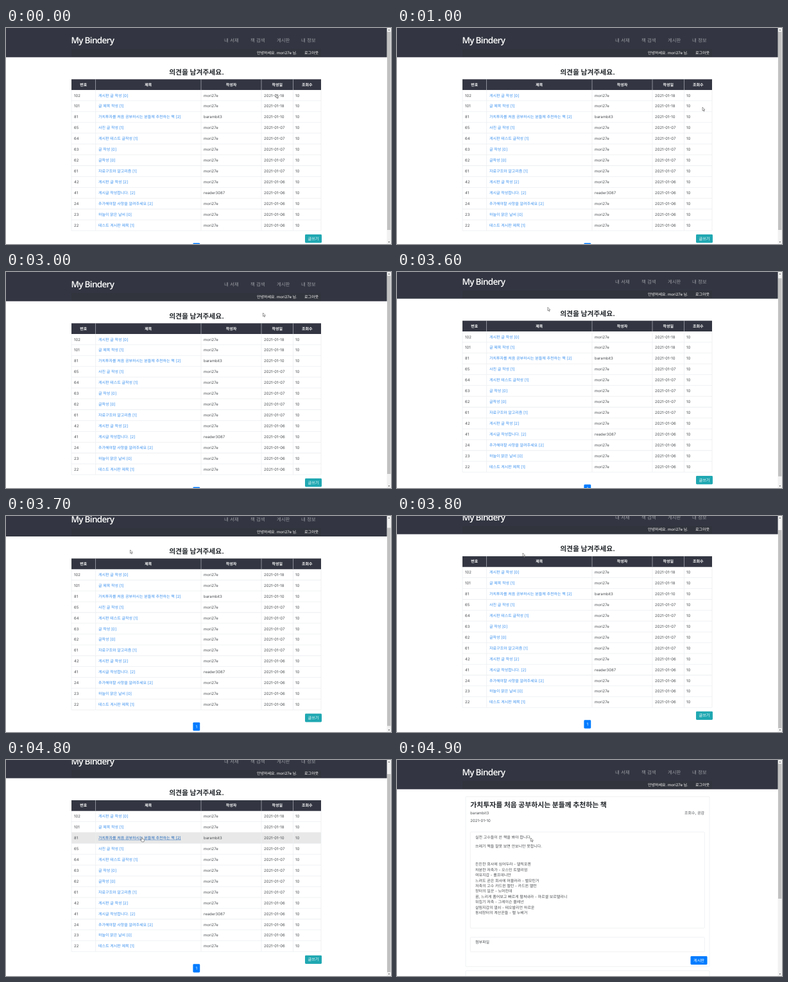
An HTML page with a canvas that plays this animation: 600 by 338 pixels, repeating every 5000 ms.

```html
<!DOCTYPE html>
<html lang="ko">
<head>
<meta charset="utf-8">
<style>
  html, body { margin: 0; width: 100%; height: 100%; overflow: hidden; background: #fff; }
  canvas { display: block; }
</style>
</head>
<body>
<canvas id="stage" width="600" height="338"></canvas>
<script>
const ctx = document.getElementById('stage').getContext('2d');
const SANS = 'Inter, "Noto Sans CJK KR", "Noto Sans CJK", sans-serif';
const LOOP = 5000, STEP = 100, OPEN_POST = 4900;
const DARK = '#333642', BLUE = '#007bff', TEAL = '#20a8b2', LINK = '#3a90ee', INK = '#4a4d50', LINE = '#eceef0';
const ROW_TOP = 97, ROW_H = 16.93;
const COLUMNS = [102, 139.7, 304, 398, 447.5, 491];
const USER = 'mori27e';
const POST_TITLE = '가치투자를 처음 공부하시는 분들께 추천하는 책';

const ROWS = [
  [102, '게시판 글 작성 [0]', USER, '18'],
  [101, '글 제목 작성 [1]', USER, '18'],
  [81, POST_TITLE + ' [2]', 'barambit3', '10'],
  [65, '사진 글 작성 [1]', USER, '07'],
  [64, '게시판 테스트 글작성 [1]', USER, '07'],
  [63, '글 작성 [0]', USER, '07'],
  [62, '글작성 [0]', USER, '07'],
  [61, '자료구조와 알고리즘 [1]', USER, '07'],
  [42, '게시판 글 작성 [2]', USER, '06'],
  [41, '게시글 작성합니다. [2]', 'reader3087', '06'],
  [24, '추가해야할 사항을 알려주세요 [2]', USER, '06'],
  [23, '하늘이 맑은 날씨 [0]', USER, '06'],
  [22, '테스트 게시판 제목 [1]', USER, '06'],
];

const BOOKS = [
  '든든한 회사에 심어두라 - 델릭포렌',
  '차분한 저축가 - 오스민 트렐리엄',
  '여유지갑 - 롤프데니만',
  '느려도 곧은 회사에 머물러라 - 벨모틴거',
  '저축의 고수 카드윈 멜턴 - 카드윈 멜턴',
  '장터의 일꾼 - 노머린데',
  '꿈, 느리게 품어보고 빠르게 펼쳐내라 - 마르셀 보르텔리니',
  '뒤집기 저축 - 그레이슨 몰레넌',
  '살림지갑의 열쇠 - 테오발리언 하르운',
  '동네장터의 계산꾼들 - 펠 누베거',
];

// [time, x, y]
const POINTER = [
  [0, 421, 104], [500, 448, 106], [700, 448, 106], [1000, 476, 124], [1100, 476, 124],
  [1400, 490, 130], [1800, 490, 130], [2300, 495, 133], [2400, 495, 133], [2600, 483, 144],
  [2800, 496, 154], [2900, 496, 154], [3000, 400.5, 64], [3200, 400.5, 64],
  [3700, 193.5, 53], [3800, 196, 58], [4100, 210, 102], [4400, 211, 121],
  [4800, 211, 121], [4900, 208.5, 122],
];
const SCROLL = [[3500, 0], [3600, 4], [3700, 13.7], [3800, 17.3]];

function track(keys, t) {
  const next = keys.findIndex(k => k[0] > t);
  if (next === 0) return keys[0].slice(1);
  if (next < 0) return keys[keys.length - 1].slice(1);
  const a = keys[next - 1], b = keys[next], p = (t - a[0]) / (b[0] - a[0]);
  return a.slice(1).map((v, i) => v + (b[i + 1] - v) * p);
}

function rect(x, y, w, h, color, radius = 0) {
  ctx.fillStyle = color;
  ctx.beginPath();
  ctx.roundRect(x, y, w, h, radius);
  ctx.fill();
}

function frame(x, y, w, h) {
  ctx.strokeStyle = LINE;
  ctx.lineWidth = 0.8;
  ctx.beginPath();
  ctx.roundRect(x, y, w, h, 1);
  ctx.stroke();
}

// y is the vertical middle of the line
function text(str, x, y, { size = 6, color = INK, weight = 400, align = 'left', family = SANS, spacing = 0 } = {}) {
  ctx.font = `${weight} ${size}px ${family}`;
  ctx.letterSpacing = spacing + 'px';
  ctx.textAlign = align;
  ctx.fillStyle = color;
  ctx.fillText(str, x, y + size * 0.36);
}

function button(label, x, y, w, color) {
  rect(x, y, w, 13.2, color, 1.4);
  text(label, x + w / 2, y + 6.4, { color: '#fff', align: 'center', size: 6.2 });
}

function drawHeader() {
  rect(0, -1, 594, 46.7, DARK);
  rect(102, 33, 389, 12, '#31343c');
  text('My Bindery', 101.5, 19.2, {
    size: 13.5, color: '#fff', weight: 600, spacing: -0.7, family: '"Open Sans", "Noto Sans", sans-serif',
  });
  [['내 서재', 340], ['책 검색', 381], ['게시판', 422], ['내 정보', 460]]
    .forEach(([label, x]) => text(label, x, 19.5, { size: 7.4, color: '#999aa0' }));
  text(`안녕하세요. ${USER} 님.`, 391, 38.5, { color: '#fff' });
  text('로그아웃', 465, 38.5, { color: '#fff' });
}

function drawRow([id, title, author, day], i, hovered) {
  const top = ROW_TOP + i * ROW_H, y = top + 8.4;
  if (hovered) rect(102, top, 389, ROW_H, '#e8e8e8');
  text(id, 106, y);
  text(title, 144, y, { color: hovered ? '#1f66b8' : LINK });
  if (hovered) rect(144, y + 2.9, ctx.measureText(title).width, 0.5, '#1f66b8');
  text(author, 308, y);
  text('2021-01-' + day, 402, y);
  text('10', 451, y);
  rect(102, top + ROW_H - 0.4, 389, 0.8, LINE);
}

function drawList(hovered) {
  text('의견을 남겨주세요.', 297, 68.8, { size: 10.8, weight: 700, align: 'center', color: '#212529' });
  ROWS.forEach((row, i) => drawRow(row, i, i === hovered));
  const bottom = ROW_TOP + ROWS.length * ROW_H;
  COLUMNS.forEach(x => rect(x - 0.4, ROW_TOP, 0.8, bottom - ROW_TOP, LINE));
  rect(102, 80.3, 389, 16.7, DARK);
  COLUMNS.slice(1, -1).forEach(x => rect(x - 0.3, 80.3, 0.6, 16.7, '#c9ccd0'));
  ['번호', '제목', '작성자', '작성일', '조회수'].forEach((label, i) =>
    text(label, (COLUMNS[i] + COLUMNS[i + 1]) / 2, 88.5, { color: '#fff', weight: 700, align: 'center' }));
  button('글쓰기', 466, 323, 26, TEAL);
  button('1', 291.4, 336.6, 10.8, BLUE);
}

function drawPost() {
  frame(107, 57.3, 380, 266);
  text(POST_TITLE, 114.3, 70.5, { size: 10.85, weight: 700, color: '#212529' });
  text('barambit3', 114.3, 83);
  text('2021-01-10', 114.3, 94.5);
  text('조회수, 공감', 479, 83, { align: 'right' });
  frame(114.3, 112.7, 365, 150.3);
  text('실전 고수들이 쓴 책을 봐야 합니다.', 122, 121);
  text('쓰레기 책들 잘못 보면 안보니만 못합니다.', 122, 135);
  BOOKS.forEach((line, i) => text(line, 122, 163 + i * 8.45));
  frame(114.3, 277.3, 365, 22.7);
  text('첨부파일', 122, 285);
  button('게시판', 457.5, 307, 26, BLUE);
  frame(107, 329.7, 380, 60);
}

function drawScrollbar(top, height) {
  rect(593.6, 0, 6.4, 338, '#f1f1f1');
  rect(594, top, 5.4, height, '#c1c1c1');
  ctx.fillStyle = '#555';
  [[3, -1], [335, 1]].forEach(([y, dir]) => {
    ctx.beginPath();
    ctx.moveTo(595.6, y - dir * 0.7);
    ctx.lineTo(598.2, y - dir * 0.7);
    ctx.lineTo(596.9, y + dir * 0.9);
    ctx.fill();
  });
}

function drawPointer(x, y, hand) {
  const shape = new Path2D(hand
    ? 'M0 .6Q.7-.3 1.3.6V2.6L4 3.2Q4.6 3.4 4.5 4.2L3.9 7H.6L-1.4 4.3Q-1.3 3.4-.5 3.9L0 4.4Z'
    : 'M0 0V5.4L1.3 4.3 2.2 6.4 3.1 6 2.2 4H3.9Z');
  ctx.save();
  ctx.translate(x, y);
  ctx.fillStyle = '#fff';
  ctx.strokeStyle = '#333';
  ctx.lineWidth = 0.5;
  ctx.fill(shape);
  ctx.stroke(shape);
  ctx.restore();
}

function draw(t) {
  const isPost = t >= OPEN_POST;
  const [x, y] = track(POINTER, t);
  const scroll = isPost ? 0 : track(SCROLL, t)[0];
  // only the title column reacts to the pointer
  const row = x < COLUMNS[2] ? Math.floor((y + scroll - ROW_TOP) / ROW_H) : -1;
  const hovered = !isPost && row >= 0 ? row : -1;

  rect(0, 0, 600, 338, '#fff');
  ctx.save();
  ctx.translate(0, -scroll);
  drawHeader();
  if (isPost) drawPost();
  else drawList(hovered);
  ctx.restore();
  drawScrollbar(6 + scroll * 0.92, isPost ? 211 : 310);
  drawPointer(x, y, hovered >= 0);
}

ctx.textRendering = 'geometricPrecision';
const start = performance.now();
function tick() {
  const t = (performance.now() - start) % LOOP;
  draw(Math.floor(t / STEP) * STEP);
  requestAnimationFrame(tick);
}
tick();
</script>
</body>
</html>
```
